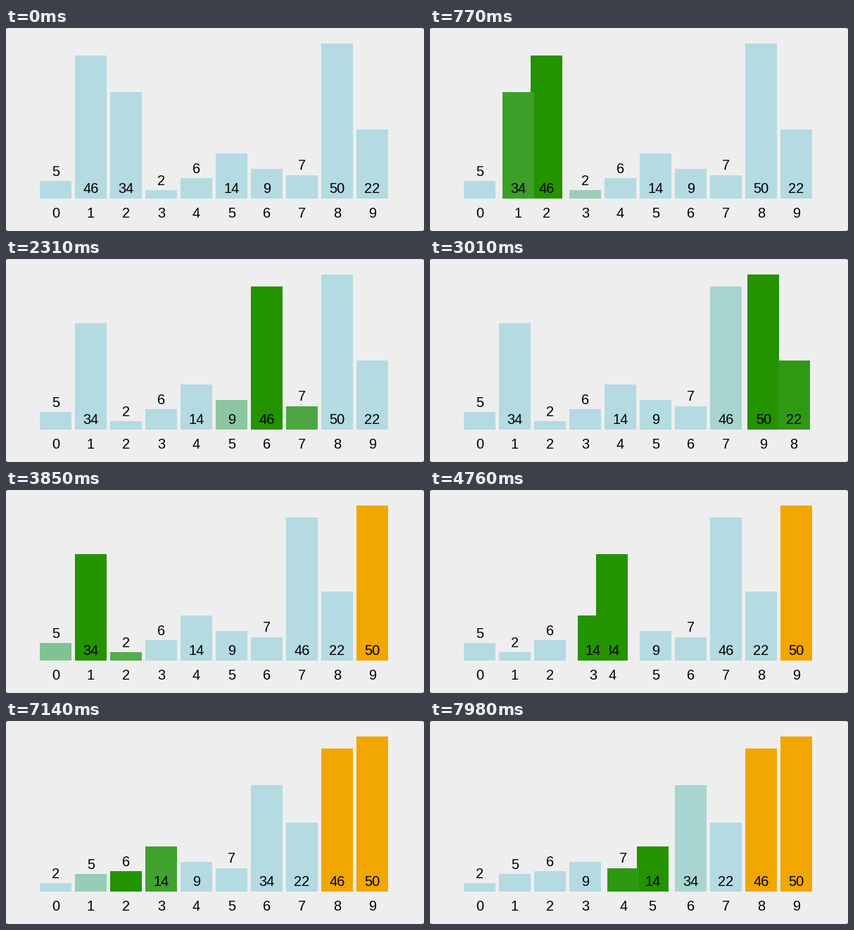
Write a matplotlib script that moves like this. It is 594x288 px and loops after 8 s.

```python
import numpy as np
import matplotlib.pyplot as plt
from matplotlib.animation import FuncAnimation
from matplotlib.colors import to_rgb
from matplotlib.patches import FancyBboxPatch, Rectangle

W, H, DPI = 594, 288, 100
LOOP, TICK, HOLD = 8000, 20, 70      # ms: loop, timer, time one picture stays

VALUES = [5, 46, 34, 2, 6, 14, 9, 7, 50, 22]
LEFT, PITCH, BAR_W, BASE = 48, 50, 45, 242
BLUE, GREEN, ORANGE = (np.array(to_rgb(c)) for c in ("#b4dae2", "#239300", "#f2a600"))

FADE = 331          # length of every transition
SWAP_DELAY = 185    # from highlight to swap
PASS_DELAY = 360    # from last highlight of a pass to marking it sorted

# Start of each comparison, one row per bubble pass
STARTS = [
    [135, 375, 722, 1070, 1462, 1815, 2170, 2540, 2798],
    [3490, 3725, 4073, 4420, 4775, 5125, 5475, 5715],
    [6385, 6745, 6975, 7215, 7580, 7951],
]

u = np.linspace(0, 1, 201)
EASE_X = 0.75 * u * (1 - u) ** 2 + 0.75 * u**2 * (1 - u) + u**3
EASE_Y = 0.3 * u * (1 - u) ** 2 + 3 * u**2 * (1 - u) + u**3


def ease(elapsed):
    return np.interp(elapsed / FADE, EASE_X, EASE_Y)


def follow(value, events, t):
    """Chain eased transitions towards each event's target."""
    for start, target in events:
        if t > start:
            value = value + (target - value) * ease(t - start)
    return value


def bar_height(v):
    return 220 - (50 - v) * 4.34


def plan():
    """Run the bubble sort and collect colour and slot events per bar."""
    colors = [[] for _ in VALUES]
    slots = [[] for _ in VALUES]
    order = list(range(len(VALUES)))
    lit = set()
    for done, starts in enumerate(STARTS):
        for i, start in enumerate(starts):
            a, b = order[i], order[i + 1]
            for bar in lit - {a, b}:
                colors[bar].append((start, BLUE))
            for bar in {a, b} - lit:
                colors[bar].append((start, GREEN))
            lit = {a, b}
            if VALUES[a] > VALUES[b]:
                order[i], order[i + 1] = b, a
                slots[a].append((start + SWAP_DELAY, i + 1))
                slots[b].append((start + SWAP_DELAY, i))
        last = len(VALUES) - 1 - done
        if len(starts) == last:
            end = starts[-1] + PASS_DELAY
            colors[order[last]].append((end, ORANGE))
            colors[order[last - 1]].append((end, BLUE))
            lit = set()
    return colors, slots


class Bar:
    def __init__(self, ax, index, colors, slots):
        self.index, self.colors, self.slots = index, colors, slots
        value = VALUES[index]
        h = bar_height(value)
        z = 2 + index
        self.rect = ax.add_patch(Rectangle((0, BASE - h), BAR_W, h, lw=0, zorder=z))
        text_y = BASE - 8 if h > 40 else BASE - h - 7.3
        style = dict(ha="center", va="baseline", color="black", zorder=z + 0.5)
        self.value = ax.text(0, text_y, str(value), **style)
        self.label = ax.text(0, 269, "", **style)

    def update(self, t):
        x = LEFT + PITCH * follow(self.index, self.slots, t)
        self.rect.set_x(x)
        self.rect.set_facecolor(np.clip(follow(BLUE, self.colors, t), 0, 1))
        for text in (self.value, self.label):
            text.set_x(x + BAR_W / 2)
        slot = self.index
        for start, target in self.slots:
            if t > start:
                slot = target
        self.label.set_text(str(slot))


plt.rcParams["font.family"] = "Liberation Sans"
plt.rcParams["font.size"] = 20 * 72 / DPI

fig = plt.figure(figsize=(W / DPI, H / DPI), dpi=DPI, facecolor="#555555")
ax = fig.add_axes([0, 0, 1, 1])
ax.set_xlim(0, W)
ax.set_ylim(H, 0)
ax.axis("off")
ax.add_patch(FancyBboxPatch((0, 0), W, H, boxstyle="round,pad=0,rounding_size=3",
                            fc="#eeeeee", lw=0, zorder=0))

bars = [Bar(ax, i, c, s) for i, (c, s) in enumerate(zip(*plan()))]


def update(frame):
    t = (frame * TICK + TICK // 2) // HOLD * HOLD
    for bar in bars:
        bar.update(t)
    return []


anim = FuncAnimation(fig, update, frames=LOOP // TICK, interval=TICK,
                     init_func=lambda: update(0), repeat=True, repeat_delay=0)
plt.show()
```
